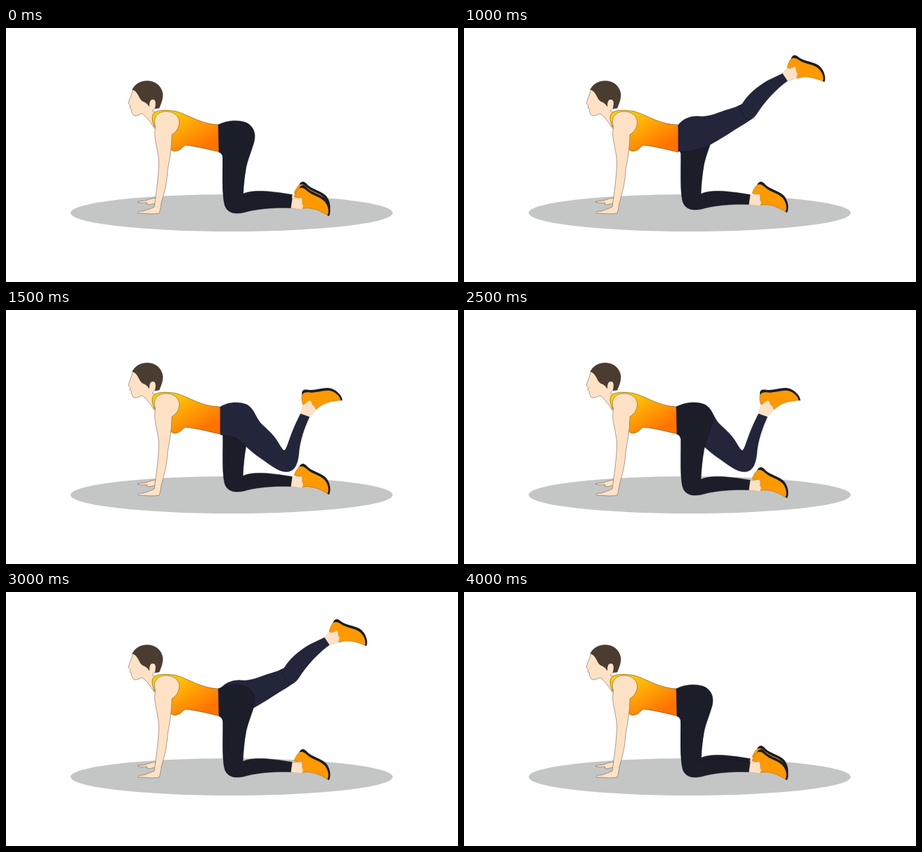
An HTML page with a canvas for the animation above (4.5 s loop, 643 by 362 pixels).

```html
<!DOCTYPE html>
<html lang="en">
<head>
<meta charset="utf-8">
<title>Kneeling leg raises</title>
<style>
html, body { margin: 0; width: 100%; height: 100%; overflow: hidden; background: #fff; }
canvas { display: block; width: 643px; height: 362px; }
</style>
</head>
<body>
<canvas id="stage" width="643" height="362"></canvas>
<script>
const ctx = document.getElementById('stage').getContext('2d');

const SKIN = '#ffe2c5', HAIR = '#4a3c31', ORANGE = '#ff9900';
const BLACK = '#1b1e28', NAVY = '#23253b', LINE = '#5b4a3c';
const STEP = 500;

// One entry per step: which leg kicks and how.
const POSES = [
  null, ['near', 'bent'], ['near', 'up'], ['near', 'bent'],
  null, ['far', 'bent'], ['far', 'up'], ['far', 'bent'], null
];

const path = d => new Path2D(d);

const head = {
  face: path('M180 87 C180 92 178 96 176 101 L174 107 C174 109 177 109 177 111 L176 114 L179 116 L178 119 C181 121 179 125 184 125 C188 125 190 123 194 122 C199 126 205 133 211 143 L225 135 L217 120 C212 121 209 119 208 118 C211 116 212 114 213 112 L211 98 L192 87 Z'),
  hair: path('M180 87.5 C184 79 193 75 202 75.5 C214 76 222 84 223 95 C223 103 220 108 218 114 L212 115 C214 109 213 102 209 102 C205 102 204 107 204 112 C201 108 199 106 196 105 C189 103 190 92 180 87.5 Z'),
  ear: path('M204 112 C204 106 205 102 209 102 C214 102 213 110 211 114 C209 118 205 116 204 112 Z')
};

const vest = path('M211 120.5 C218 116 230 117 241 118.5 C259 123 278 138 305 138 L305 177 C288 173 268 168 255 167 C250 170 248 175.5 240 175.5 C236 175.5 234 173 234 171 L236 148 L214 137 L211 141 C208 132 206 125 211 120.5 Z');
const arm = path('M212.5 140 C209 130 213 119 228 119 C239 119 247 126 246.5 135 C246 143 242 148 236 152 C236 170 233 185 230 202 C229 222 225 235 221 249 C220 256 219 261 218 264 C208 266 197 264 189 264 C186 263 188 261 195 261 C201 259 207 257 211 255 C213 238 217 215 217.5 190 C216 171 210 157 212 145 Z');
const farHand = path('M213 242 C207 243 203 244 199 246 C194 247 190 246 187 248 C191 250 196 249 201 249 L200 251 C204 253 209 250 213 250 Z');

const support = {
  leg: path('M302 138 C312 132 330 130 342 135 C352 140 356 150 353 162 C350 173 344 187 341.5 199 C339 213 337.5 228 337 241.5 C350 235 375 237 407 242.5 L405 256.5 C380 255.5 355 258 338 263 C325 266 314 263 311 252 C307 235 309 205 308.5 184 C308 181 306 178 303 177 Z'),
  ankle: path('M407 242.5 C411 245 415 242 420 242 C423 245 420 249 422 252 C424 255 421 257 421 258.5 L405 256.5 Z'),
  heel: [417, 228.5], angle: 43
};

const kicks = {
  up: {
    leg: path('M305 138 C311 130 322 125 335 126 C348 127 358 122 370 118 C380 115 390 112 396 108 C403 96 415 85 432 75 L453 65 L460 75.5 C445 86 428 104 416 123 C409 131 398 137 385 145 C370 155 350 167 340 171 C325 176 312 177 305 175.5 Z'),
    crease: path('M391 110 C395 119 398 128 404 131 C409 131 413 128 415 124'),
    ankle: path('M453 65 L460 57 C464 59 467 57 470 55 C474 57 471 61 474 64 C475 67 473 69 473.5 71.5 L460 75.5 Z'),
    heel: [465, 44], angle: 34.5
  },
  bent: {
    leg: path('M305 138 C315 131 332 130 343 135 C353 141 354 151 362 161 C371 170 379 176 386 187 C391 195 394 201 396.5 200 C401 196 403 179 419 148 L431.5 152.5 C425 167 418 185 416.5 205 C415 219 411 230.5 399 230.5 C388 231 375 220 362 211 C348 202 340 192 330 184 C322 179 312 180 305 177.5 Z'),
    ankle: path('M419 148 L422.5 135 C426 135 427 131 432 129 C436 130 434 134 437 136 C440 137 439 140 441 141.5 L431.5 152.5 Z'),
    heel: [421, 121], angle: 7.5
  }
};

// Shoe with the heel at the origin and the toe along the x axis.
const upper = path('M0 0 C0 5 1 10 3.2 13.5 C7 13 9 9 13 8 C18 9 17 16 23 18 C30 8 42 3 58 0 L50 -9 L38 -13 L28 -11 L15 -7 L2 -5 Z');
const sole = path('M0 0 C-2 -8 3 -8.5 8 -8.3 C18 -8 27 -14.5 37 -14.8 C46 -15 57 -7 58 0 L55.5 0.5 C54 -6 45 -11 38 -11 C29 -11 20 -5 11 -5 C5 -5 2 -4 0 0 Z');

function shape(p, fill, stroke, width = 0.6) {
  ctx.fillStyle = fill;
  ctx.fill(p);
  if (stroke) {
    ctx.strokeStyle = stroke;
    ctx.lineWidth = width;
    ctx.stroke(p);
  }
}

function shoe([x, y], angle) {
  ctx.save();
  ctx.translate(x, y);
  ctx.rotate(angle * Math.PI / 180);
  shape(upper, ORANGE, '#a86712', 0.5);
  shape(sole, BLACK);
  ctx.restore();
}

function limb(part, color) {
  shoe(part.heel, part.angle);
  shape(part.ankle, SKIN, '#c9a98c', 0.4);
  shape(part.leg, color, '#11131b', 0.5);
  if (part.crease) {
    ctx.strokeStyle = '#11131b';
    ctx.lineWidth = 0.6;
    ctx.stroke(part.crease);
  }
}

function farSupport() {
  ctx.save();
  ctx.beginPath();
  ctx.rect(300, 165, 180, 110);
  ctx.clip();
  ctx.translate(0, -5);
  limb(support, BLACK);
  ctx.restore();
}

function floor() {
  ctx.fillStyle = '#c4c6c5';
  ctx.beginPath();
  ctx.ellipse(321, 263.5, 229, 26.5, 0, 0, Math.PI * 2);
  ctx.fill();
}

function upperBody() {
  const glow = ctx.createLinearGradient(240, 118, 274, 174);
  glow.addColorStop(0, '#ffcc05');
  glow.addColorStop(0.5, '#ffa004');
  glow.addColorStop(1, '#ff7400');
  shape(farHand, SKIN, LINE, 0.5);
  shape(head.face, SKIN, LINE, 0.5);
  shape(vest, glow, '#6b4a14');
  shape(arm, SKIN, LINE, 0.5);
  shape(head.hair, HAIR, '#30261f', 0.5);
  shape(head.ear, SKIN);
}

function draw(pose) {
  const [side, kind] = pose || [];
  ctx.fillStyle = '#fff';
  ctx.fillRect(0, 0, 643, 362);
  floor();
  if (side === 'far') limb(kicks[kind], NAVY);
  else farSupport();
  upperBody();
  if (side === 'near') limb(kicks[kind], NAVY);
  else limb(support, BLACK);
}

const start = performance.now();
function tick() {
  const elapsed = performance.now() - start;
  draw(POSES[Math.floor(elapsed / STEP) % POSES.length]);
  requestAnimationFrame(tick);
}
tick();
</script>
</body>
</html>
```
